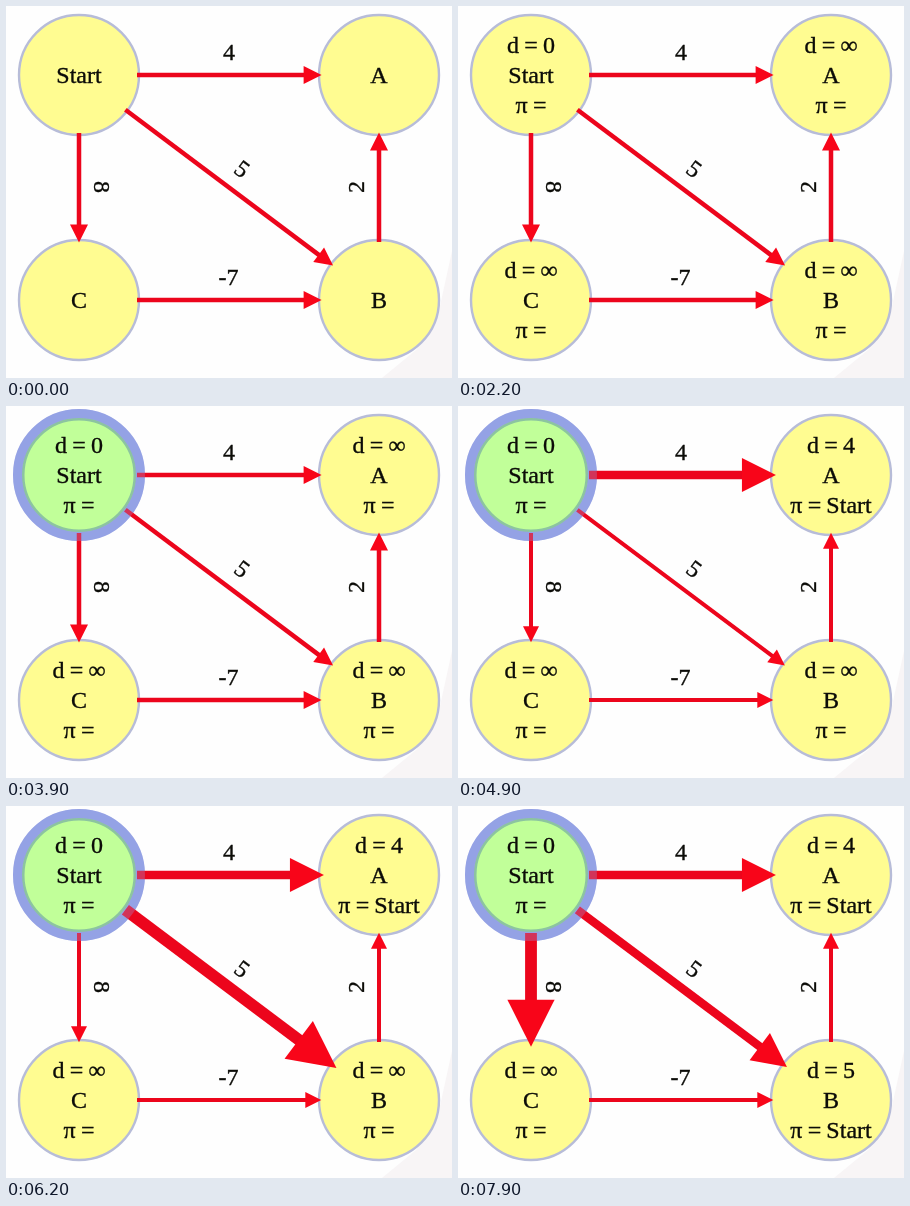
An HTML page with a canvas for the animation above (8000 ms loop, 446 by 372 pixels).

```html
<!DOCTYPE html>
<html lang="en">
<head>
<meta charset="utf-8">
<title>Shortest paths</title>
<style>
html, body { margin: 0; width: 100%; height: 100%; overflow: hidden; background: #fefefe; }
canvas { display: block; width: 446px; height: 372px; }
</style>
</head>
<body>
<canvas id="stage" width="446" height="372"></canvas>
<script>
const ctx = document.getElementById('stage').getContext('2d');
const LOOP = 8000, R = 60;

const nodes = {
  Start: { x: 73, y: 69, d: '0' },
  A: { x: 373, y: 69, d: '∞', newD: '4', at: 4500 },
  B: { x: 373, y: 294, d: '∞', newD: '5', at: 6250 },
  C: { x: 73, y: 294, d: '∞' }
};

const edges = [
  { from: 'Start', to: 'A', label: '4', lx: 223, ly: 46, turn: 0, peak: 4500 },
  { from: 'Start', to: 'B', label: '5', lx: 236, ly: 163, turn: Math.atan2(3, 4), peak: 6150 },
  { from: 'Start', to: 'C', label: '8', lx: 96, ly: 181, turn: Math.PI / 2, peak: 7850 },
  { from: 'C', to: 'B', label: '-7', lx: 222.5, ly: 271, turn: 0 },
  { from: 'B', to: 'A', label: '2', lx: 350, ly: 181, turn: -Math.PI / 2 }
];

const mix = (a, b, p) => a + (b - a) * p;

function ease(t, start, end) {
  const p = Math.min(1, Math.max(0, (t - start) / (end - start)));
  return p * p * (3 - 2 * p);
}

function text(str, x, y, alpha = 1) {
  if (alpha <= 0) return;
  ctx.globalAlpha = alpha;
  ctx.fillStyle = ctx.strokeStyle = '#0c0c08';
  ctx.lineWidth = 0.35;
  ctx.fillText(str, x, y);
  ctx.strokeText(str, x, y);
  ctx.globalAlpha = 1;
}

function ring(n, radius, width, color) {
  ctx.beginPath();
  ctx.arc(n.x, n.y, radius, 0, Math.PI * 2);
  ctx.lineWidth = width;
  ctx.strokeStyle = color;
  ctx.stroke();
}

function drawNode(name, glow) {
  const n = nodes[name];
  ctx.beginPath();
  ctx.arc(n.x, n.y, R, 0, Math.PI * 2);
  ctx.fillStyle = `rgb(${mix(255, 193, glow)},${mix(252, 255, glow)},${mix(145, 153, glow)})`;
  ctx.fill();
  ring(n, R, 2.4, '#b7bcd8');
  if (glow > 0) {
    ring(n, R - 4, 3, `rgba(140,196,160,${glow})`);
    ring(n, R + 1.5, 9, `rgba(148,161,229,${glow})`);
  }
}

function drawLabels(name, t) {
  const n = nodes[name], shown = ease(t, 300, 700);
  const p = n.at ? ease(t, n.at, n.at + 250) : 0;
  text(name, n.x, n.y + 8);
  text('d = ' + n.d, n.x, n.y - 22, shown * (1 - p));
  text('π =', n.x, n.y + 38, shown * (1 - p));
  if (n.newD) {
    text('d = ' + n.newD, n.x, n.y - 22, p);
    text('π = Start', n.x, n.y + 38, p);
  }
}

function edgeWidth(e, t) {
  const thin = 4.5 - 0.5 * ease(t, 4100, 4500);
  if (!e.peak) return thin;
  const grown = mix(thin, 11.8, ease(t, e.peak - 400, e.peak));
  return mix(grown, 8.5, ease(t, e.peak + 100, e.peak + 350));
}

function drawEdge(e, t) {
  const a = nodes[e.from], b = nodes[e.to], w = edgeWidth(e, t);
  const length = Math.hypot(b.x - a.x, b.y - a.y);
  const tip = length - R + 0.58 * w, base = tip - 4 * w;
  ctx.save();
  ctx.translate(a.x, a.y);
  ctx.rotate(Math.atan2(b.y - a.y, b.x - a.x));
  ctx.fillStyle = '#ec051c';
  ctx.fillRect(R - 2, -w / 2, base - R + 3, w);
  ctx.fillStyle = '#f80519';
  ctx.beginPath();
  ctx.moveTo(base, -2 * w);
  ctx.lineTo(tip, 0);
  ctx.lineTo(base, 2 * w);
  ctx.fill();
  ctx.restore();

  ctx.save();
  ctx.translate(e.lx, e.ly);
  ctx.rotate(e.turn);
  text(e.label, 0, 8);
  ctx.restore();
}

function drawBackground() {
  ctx.fillStyle = '#fefefe';
  ctx.fillRect(0, 0, 446, 372);
  ctx.fillStyle = '#f8f5f6';
  ctx.beginPath();
  ctx.moveTo(446, 245);
  ctx.lineTo(434, 300);
  ctx.lineTo(410, 344);
  ctx.lineTo(376, 372);
  ctx.lineTo(446, 372);
  ctx.fill();
}

function draw(t) {
  const glow = ease(t, 3100, 3600);
  drawBackground();
  ctx.font = '24px "Liberation Serif", "Times New Roman", serif';
  ctx.textAlign = 'center';
  ctx.wordSpacing = '-0.8px';
  for (const name in nodes) drawNode(name, name === 'Start' ? glow : 0);
  for (const e of edges) drawEdge(e, t);
  if (glow > 0) ring(nodes.Start, R + 1.5, 9, `rgba(148,161,229,${0.3 * glow})`);
  for (const name in nodes) drawLabels(name, t);
}

const begin = performance.now();
function tick(now) {
  draw(Math.max(0, now - begin) % LOOP);
  requestAnimationFrame(tick);
}
draw(0);
requestAnimationFrame(tick);
</script>
</body>
</html>
```
